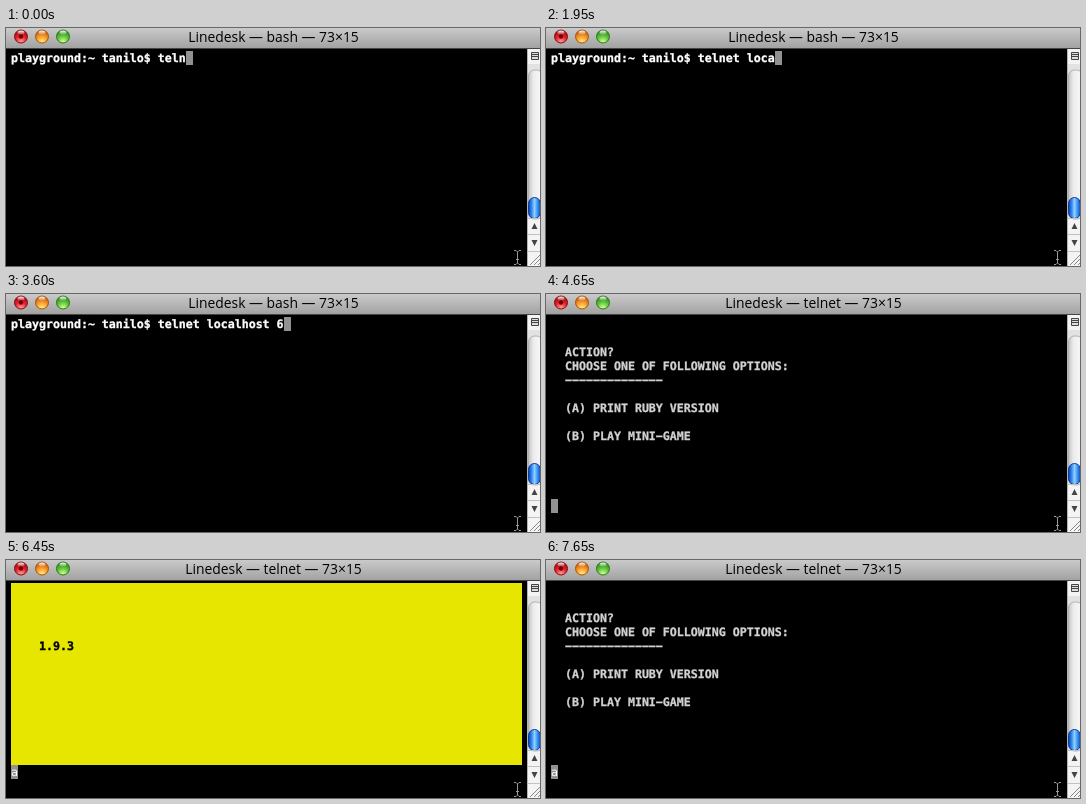
An HTML page that plays this animation: 534x238 px, repeating every 8 s.

```html
<!DOCTYPE html>
<html lang="en">
<head>
<meta charset="utf-8">
<title>Telnet session</title>
<style>
  html, body { margin: 0; width: 100%; height: 100%; overflow: hidden; background: #000; }
  svg { display: block; width: 100%; height: 100%; }
  #title { font: 13.9px "Open Sans", "Noto Sans", sans-serif; text-anchor: middle; }
  #screen text {
    font: bold 11.627px "DejaVu Sans Mono", monospace;
    text-rendering: geometricPrecision;
    white-space: pre;
    stroke-width: .3px;
  }
  #screen .plain { font-weight: normal; stroke: none; }
</style>
</head>
<body>
<svg viewBox="0 0 534 238" xmlns="http://www.w3.org/2000/svg">
  <defs>
    <linearGradient id="bar" x2="0" y2="1">
      <stop offset="0" stop-color="#cacaca"/><stop offset="1" stop-color="#a2a2a2"/>
    </linearGradient>
    <linearGradient id="track">
      <stop offset="0" stop-color="#c4c4c4"/><stop offset=".35" stop-color="#ececec"/>
      <stop offset="1" stop-color="#fafafa"/>
    </linearGradient>
    <linearGradient id="thumb">
      <stop offset="0" stop-color="#0c3fae"/><stop offset=".25" stop-color="#2f86ec"/>
      <stop offset=".5" stop-color="#8fd0ff"/><stop offset=".75" stop-color="#3c92f0"/>
      <stop offset="1" stop-color="#0f4cba"/>
    </linearGradient>
    <linearGradient id="shine" x2="0" y2="1">
      <stop offset="0" stop-color="#fff" stop-opacity=".95"/>
      <stop offset="1" stop-color="#fff" stop-opacity=".1"/>
    </linearGradient>
  </defs>

  <rect width="534" height="238"/>
  <rect width="534" height="20" fill="url(#bar)"/>
  <rect y="20" width="534" height="1" fill="#454545"/>
  <g id="lights"></g>
  <text id="title" x="267.5" y="14"></text>

  <g id="scrollbar">
    <rect x="521" y="21" width="13" height="217" fill="#f4f4f4"/>
    <rect x="521" y="21" width="1" height="217" fill="#b5b5b5"/>
    <rect x="522" y="36" width="12" height="155" fill="#e2e2e2"/>
    <rect x="522.5" y="42" width="14" height="149" rx="6" fill="url(#track)" stroke="#b0b0b0"/>
    <path d="M525.5 24.5h7v7h-7zM525.5 26.5h7M525.5 28.5h7" fill="#ddd" stroke="#444"/>
    <rect x="522.5" y="169.5" width="12" height="21" rx="6" fill="url(#thumb)" stroke="#12399a"/>
    <path d="M522 190.5h12M522 206.5h12M522 223.5h12" stroke="#c2c2c2"/>
    <path d="M525.5 201l3-6 3 6zM525.5 212l3 6 3-6z" fill="#454545"/>
    <path d="M524 237l10-10M528 237l6-6M532 237l2-2" stroke="#888"/>
  </g>

  <g id="screen"></g>
  <path d="M508 222.5h2l1.5 1.5 1.5-1.5h2M511.5 224v11M508 236.5h2l1.5-1.5 1.5 1.5h2M510 231.5h3"
        fill="none" stroke="#999"/>
</svg>

<script>
const LOOP = 8000, CELL = 7, LINE = 14, LEFT = 5, TOP = 23;
const APP = 'Linedesk', PROMPT = 'playground:~ tanilo$ ', COMMAND = 'telnet localhost 60000';

// [time, characters typed]; the count drops once for a backspace
const KEYS = [
  [0, 4], [150, 6], [300, 7], [600, 8], [1350, 7], [1650, 8], [1800, 9], [1950, 11], [2100, 12],
  [2400, 14], [2550, 15], [2700, 16], [2850, 17], [3600, 18], [3750, 19], [4050, 20], [4200, 21], [4350, 22]
];
const ENTER = 4500, MENU = 4650, ANSWER = 6000, CONFIRM = 6150, RESULT = 6450, BACK = 7500, FULL = 7650;

const title = document.getElementById('title');
const screen = document.getElementById('screen');

const block = (col, row, cols, rows, fill) =>
  `<rect x="${LEFT + col * CELL}" y="${TOP + row * LINE}" width="${cols * CELL}" height="${rows * LINE}" fill="${fill}"/>`;

const write = (col, row, text, ink = '#fff', cls = '') =>
  `<text class="${cls}" x="${LEFT + col * CELL}" y="${TOP + 11 + row * LINE}" fill="${ink}" stroke="${ink}">${text}</text>`;

const cursor = (col, row) => block(col, row, 1, 1, '#919191');

function shell(t) {
  const count = KEYS.filter(([at]) => at <= t).pop()[1];
  const line = PROMPT + COMMAND.slice(0, count);
  return write(0, 0, line) + (t < ENTER ? cursor(line.length, 0) : cursor(0, 1));
}

function menu(withOptions) {
  const lines = [[2, 'ACTION?'], [3, 'CHOOSE ONE OF FOLLOWING OPTIONS:'], [4, '−'.repeat(14)]];
  if (withOptions) lines.push([6, '(A) PRINT RUBY VERSION'], [8, '(B) PLAY MINI−GAME']);
  return lines.map(([row, text]) => write(2, row, text, '#d2d2d2')).join('');
}

function input(t) {
  if (t < ANSWER) return cursor(0, 13);
  if (t < CONFIRM) return write(0, 13, 'a') + cursor(1, 13);
  if (t < RESULT) return write(0, 13, 'a') + cursor(0, 14);
  return cursor(0, 13) + write(0, 13, 'a', '#fff', 'plain');
}

function content(t) {
  if (t < MENU) return shell(t);
  const page = t >= RESULT && t < BACK
    ? block(0, 0, 73, 13, '#e6e600') + write(4, 4, '1.9.3', '#000')
    : menu(t < RESULT || t >= FULL);
  return page + input(t);
}

function light(x, dark, mid, glow) {
  const id = 'light' + x;
  return `<radialGradient id="${id}" cy=".9" r=".9">
      <stop offset="0" stop-color="${glow}"/><stop offset=".5" stop-color="${mid}"/><stop offset="1" stop-color="${dark}"/>
    </radialGradient>
    <circle cx="${x}" cy="8.5" r="6.5" fill="url(#${id})" stroke="${dark}"/>
    <ellipse cx="${x}" cy="4.6" rx="3.4" ry="2" fill="url(#shine)"/>`;
}

document.getElementById('lights').innerHTML =
  light(15, '#8a0c12', '#e6202a', '#ff9c98') +
  '<circle cx="15" cy="8.5" r="2.2" fill="#6e0208"/>' +
  light(36, '#b0500c', '#f8962a', '#fff27a') +
  light(57, '#2c7a1c', '#5cc43c', '#d8ff90');

let shown = '';
function draw(t) {
  const next = content(t);
  if (next === shown) return;
  shown = next;
  screen.innerHTML = next;
  title.textContent = `${APP} — ${t < MENU ? 'bash' : 'telnet'} — 73×15`;
}

const start = performance.now();
function tick(now) {
  draw(Math.max(0, now - start) % LOOP);
  requestAnimationFrame(tick);
}
draw(0);
requestAnimationFrame(tick);
</script>
</body>
</html>
```
